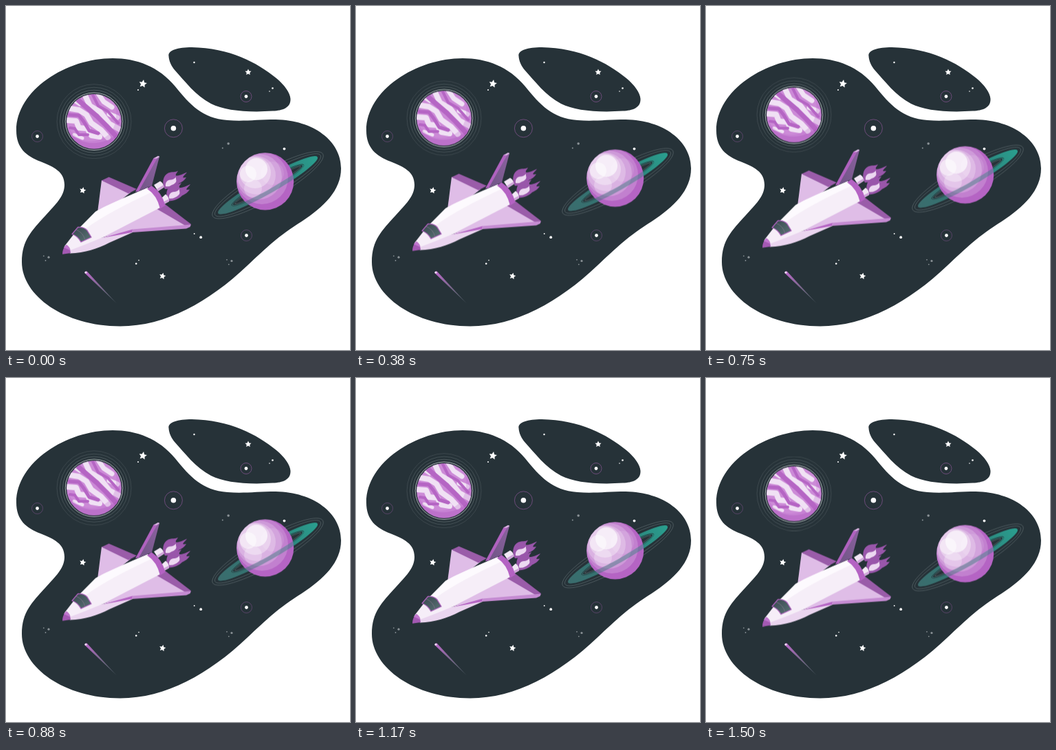
Recreate the animation shown at these times as an HTML page. Size 500 px wide and 500 px high, loop 1540 ms.

```html
<!DOCTYPE html>
<html lang="en">
<head>
<meta charset="utf-8">
<title>Space shuttle</title>
<style>
  html, body { margin: 0; width: 100%; height: 100%; overflow: hidden; background: #fff; }
  svg { display: block; width: 100%; height: 100%; }
  .float { animation: float 1540ms infinite; }
  @keyframes float {
    0% { transform: translateY(.1px); animation-timing-function: steps(18); }
    48.6486% { transform: translateY(-9.4px); animation-timing-function: steps(19); }
    100% { transform: translateY(1.05px); }
  }
  .line { fill: none; stroke: #8b9699; stroke-width: .6; }
  .orbit { fill: none; stroke: #8a5696; stroke-width: .7; }
  .dim { fill: #8a9296; }
  .pale { fill: none; stroke: #f0e1f4; stroke-linecap: round; stroke-linejoin: round; }
  .vein { fill: none; stroke: #b565c4; stroke-linecap: round; stroke-linejoin: round; }
</style>
</head>
<body>
<svg viewBox="0 0 500 500">
  <defs>
    <linearGradient id="teal">
      <stop offset="0" stop-color="#3b6c6d"/>
      <stop offset=".55" stop-color="#2d7a75"/>
      <stop offset="1" stop-color="#2a9f8f"/>
    </linearGradient>
    <linearGradient id="tail" gradientUnits="userSpaceOnUse" x1="116" y1="387" x2="160" y2="432">
      <stop offset="0" stop-color="#ba68c8"/>
      <stop offset=".6" stop-color="#87779a" stop-opacity=".75"/>
      <stop offset="1" stop-color="#7d8c96" stop-opacity=".35"/>
    </linearGradient>
    <linearGradient id="glass" x1="0" y1="0" x2="1" y2="1">
      <stop offset="0" stop-color="#38474e"/>
      <stop offset="1" stop-color="#5b7477"/>
    </linearGradient>
    <linearGradient id="fin" x1="1" y1="0" x2="0" y2="1">
      <stop offset="0" stop-color="#8d62a0"/>
      <stop offset="1" stop-color="#6f5585"/>
    </linearGradient>
    <clipPath id="marble"><circle cx="128" cy="167.7" r="39.8"/></clipPath>
    <clipPath id="globe"><circle cx="376.7" cy="254.8" r="41.6"/></clipPath>
    <clipPath id="front"><rect x="-100" y="0" width="200" height="40"/></clipPath>
    <path id="star" d="M0-6 1.8-2.2 5.7-1.9 2.8 1 3.5 4.9 0 3-3.5 4.9-2.8 1-5.7-1.9-1.8-2.2Z"/>
    <path id="ring" fill="url(#teal)" fill-rule="evenodd" d="M-83 0A83 12.2 0 0 1 83 0A83 12.2 0 0 1-83 0ZM-58 0A58 6.2 0 0 0 58 0A58 6.2 0 0 0-58 0Z"/>
    <g id="flame">
      <path fill="#9956aa" d="M231 266C226 258 228 246 236 242.5C241 240.5 246 242 250 239.5C249 242 246 244 247 246.5C250 247 256 245 263 241.5C262 244 258 246 257 249C259 250 261 249 262 249C259 254 255 256 251 258C247 262 240 266 231 266Z"/>
      <path fill="#ecd8f1" d="M232 262C231 256 235 252 240 252.5C243 252 246 250 247 248.5C246.5 252 249 254 246 257C242 261 237 263 232 262Z"/>
    </g>
  </defs>

  <g fill="#263238">
    <path d="M155 76C190 76 222 88 246 117C268 144 285 163 322 166C345 168 365 165 392 165C447 166 487 196 487 236C487 268 462 292 430 313C395 335 380 350 350 378C295 430 232 465.5 166 465.5C85 465.5 23 421 23 372C23 340 38 326 57 305C72 288 85 277 85 260C85 241 70 234 50 226C29 218 15 206 15 181C15 122 88 76 155 76Z"/>
    <path d="M236.5 73C235 64 250 60 270 60C325 61 365 82 393 105C405 115 413 126 413.5 135C414 148 402 152 388 152.6C350 155 318 152 298 142C275 130 260 109 246 94C240 87 237 80 236.5 73Z"/>
  </g>

  <g fill="#fff">
    <use href="#star" transform="translate(199 113) rotate(10)"/>
    <use href="#star" transform="translate(352 96.2) scale(.8)"/>
    <use href="#star" transform="translate(111.5 268) rotate(12) scale(.82)"/>
    <use href="#star" transform="translate(227.5 392.6) rotate(12) scale(.82)"/>
    <circle cx="273.5" cy="82" r="1.2"/>
    <circle cx="387.5" cy="119.5" r="1.3"/>
    <circle cx="383" cy="124" r=".8"/>
    <circle cx="192" cy="122" r="1"/>
    <circle cx="404.5" cy="207.6" r="1.9"/>
    <circle cx="273.7" cy="331" r=".9"/>
    <circle cx="283.2" cy="336.2" r="1.9"/>
    <circle cx="189.2" cy="374.5" r="1.3"/>
    <circle cx="193" cy="369.6" r=".8"/>
    <circle cx="349" cy="131.5" r="2.4"/>
    <circle cx="45.5" cy="189.5" r="2.4"/>
    <circle cx="243.4" cy="177.8" r="3.8"/>
    <circle cx="349.5" cy="333.5" r="2.4"/>
  </g>
  <g class="orbit">
    <circle cx="349" cy="131.5" r="8"/>
    <circle cx="45.5" cy="189.5" r="8" stroke-opacity=".7"/>
    <circle cx="243.4" cy="177.8" r="13"/>
    <circle cx="349.5" cy="333.5" r="8" stroke-opacity=".7"/>
  </g>
  <g class="dim">
    <circle cx="323.2" cy="200" r="1.8"/><circle cx="314.8" cy="206.5" r="1"/>
    <circle cx="62" cy="365.2" r="1.6"/><circle cx="54.8" cy="363.3" r=".9"/><circle cx="57.5" cy="370" r=".9"/>
    <circle cx="328" cy="370.5" r="1.6"/><circle cx="321" cy="368.8" r=".9"/><circle cx="323.8" cy="375.6" r=".9"/>
  </g>

  <path fill="url(#tail)" d="M114.4 388.3Q114 385 117.6 385.6L161 432.6Z"/>
  <circle cx="116" cy="387.2" r="1.5" fill="#f0e1f4"/>

  <g class="float">
    <!-- marbled planet -->
    <g class="line">
      <circle cx="128" cy="167.7" r="41.8" stroke="#b9c0c2" stroke-width=".9"/>
      <circle cx="128" cy="167.7" r="45.5" stroke-opacity=".75"/>
      <circle cx="128" cy="167.7" r="49.5" stroke-opacity=".55"/>
      <circle cx="128" cy="167.7" r="54" stroke-opacity=".4"/>
    </g>
    <g clip-path="url(#marble)">
      <path fill="#cc8ad7" d="M86 125h84v84h-84z"/>
      <g class="pale">
        <path stroke-width="8" d="M115 130L122 145 137 154 150 171 165 179"/>
        <path stroke-width="7" d="M134 127L142 139 154 147M150 157L162 162"/>
        <path stroke-width="8" d="M94 149L106 151 117 158 124 170 138 180 148 191"/>
        <path stroke-width="8" d="M89 166L102 167 106 177 118 178 124 188 136 190"/>
        <path stroke-width="5" d="M101 139L107 143M99 187L111 192"/>
      </g>
      <g class="vein">
        <path stroke-width="7" d="M104 136L118 148 132 160 146 174 160 189"/>
        <path stroke-width="5" d="M92 158L106 159 113 168 121 181 134 185"/>
        <path stroke-width="4" d="M126 129L134 145 148 153 163 170M93 177L100 178 106 187 119 187"/>
      </g>
      <path fill="#b565c4" fill-opacity=".26" d="M88 166C92 194 123 205 145 190C158 181 163 164 159 143L174 155 165 208 128 213 84 202Z"/>
      <path fill="#a653b7" fill-opacity=".32" d="M91 182C107 202 137 207 165 184L158 208 128 212 96 205Z"/>
    </g>

    <!-- ringed planet -->
    <g transform="translate(380.5 260.3) rotate(-29.5)">
      <g class="line" stroke-opacity=".6">
        <ellipse rx="92" ry="20.5"/>
        <ellipse rx="88" ry="16.5"/>
      </g>
      <use href="#ring"/>
      <ellipse rx="60" ry="7.8" fill="none" stroke="#263238" stroke-width=".8"/>
      <ellipse rx="55" ry="4.4" class="line" stroke-opacity=".6"/>
    </g>
    <g clip-path="url(#globe)">
      <path fill="#b564c4" d="M334 212h86v86h-86z"/>
      <g fill="#fff">
        <circle cx="372" cy="250" r="38" fill-opacity=".18"/>
        <circle cx="368" cy="248" r="33" fill-opacity=".2"/>
        <circle cx="364" cy="246" r="28" fill-opacity=".24"/>
        <circle cx="362" cy="242" r="23" fill-opacity=".34"/>
        <circle cx="364" cy="237" r="16" fill-opacity=".65"/>
        <circle cx="352" cy="244" r="12" fill-opacity=".5"/>
        <circle cx="359" cy="265" r="13" fill-opacity=".25"/>
        <circle cx="387" cy="243" r="17" fill-opacity=".1"/>
      </g>
    </g>
    <g transform="translate(380.5 260.3) rotate(-29.5)" clip-path="url(#front)" opacity=".42">
      <use href="#ring"/>
    </g>

    <!-- engines -->
    <use href="#flame"/>
    <use href="#flame" transform="translate(5 17.5)"/>
    <g fill="#f2e7f5">
      <path d="M215 260L224 254.5Q229 257 229.5 263.5L221 269Z"/>
      <path d="M226 279L232 273.5Q237 277 237 284L229 288.5Z"/>
    </g>
    <path fill="#cfa5d9" d="M219 266L229 260 229.5 263.5 221 269ZM228 285L236.5 280.5 237 284 229 288.5Z"/>

    <!-- belly and wings -->
    <path fill="#ead5ef" d="M84 350L141 336 187 322 184 329 150 344C133 353 115 358.5 93 359.5Z"/>
    <path fill="#dfbde7" d="M139 253L181 271 154 292 133 300Z"/>
    <path fill="#9a5ca9" d="M139 253.5L149.5 248.5 190 266 178 272.5Z"/>
    <path fill="#dfbde7" d="M140 336L218 290 265 320.5 184 326Z"/>
    <path fill="#9a5ca9" d="M216 293L228 285.5 269 317 264 321Z"/>
    <path fill="#c58bd2" d="M184 324.5L269 317.5 267.5 321 262 323.5 183 329Z"/>
    <path fill="#b565c4" d="M140 337L184 324.5 183 329Z"/>

    <!-- fuselage -->
    <path fill="#f6eef8" d="M85 349L99 331 130 299Q140 292 206 264Q220 274 226 292L141 336Q115 347 93 355Z"/>
    <path fill="#fdfafe" d="M104 325L130 299Q140 292 206 264L213 270Q150 299 118 322Z"/>
    <path fill="#b462c3" d="M205 265.5L211.5 261Q227 271 231.5 290L224 294.5Q219.500 275 205 265.5Z"/>
    <path fill="#a459b3" d="M82 360.7C82 355 84 350 88 347Q93 350 94 359Z"/>
    <path fill="#c177cf" d="M84 351Q86 348 88 347Q93 350 93.5 355Z"/>
    <path fill="url(#glass)" stroke="#b062bf" stroke-width="1.3" stroke-linejoin="round" d="M96 331.5L104.500 321.500Q113 320.5 118 326L124 336 109 343Q104 334 96 331.5Z"/>
    <path fill="none" stroke="#7d7287" stroke-width=".8" d="M102 325Q112 329 115 340"/>

    <!-- tail fin -->
    <path fill="#b062bf" d="M188 270L214.500 221 222.500 218 221 224 194 269Z"/>
    <path fill="url(#fin)" d="M193 269L219.500 221.500 223 219 212 261Z"/>
    <path fill="#dfbde7" d="M214.5 221.5L221 217.700 223.5 219 219 221.500Z"/>
  </g>
</svg>
</body>
</html>
```
